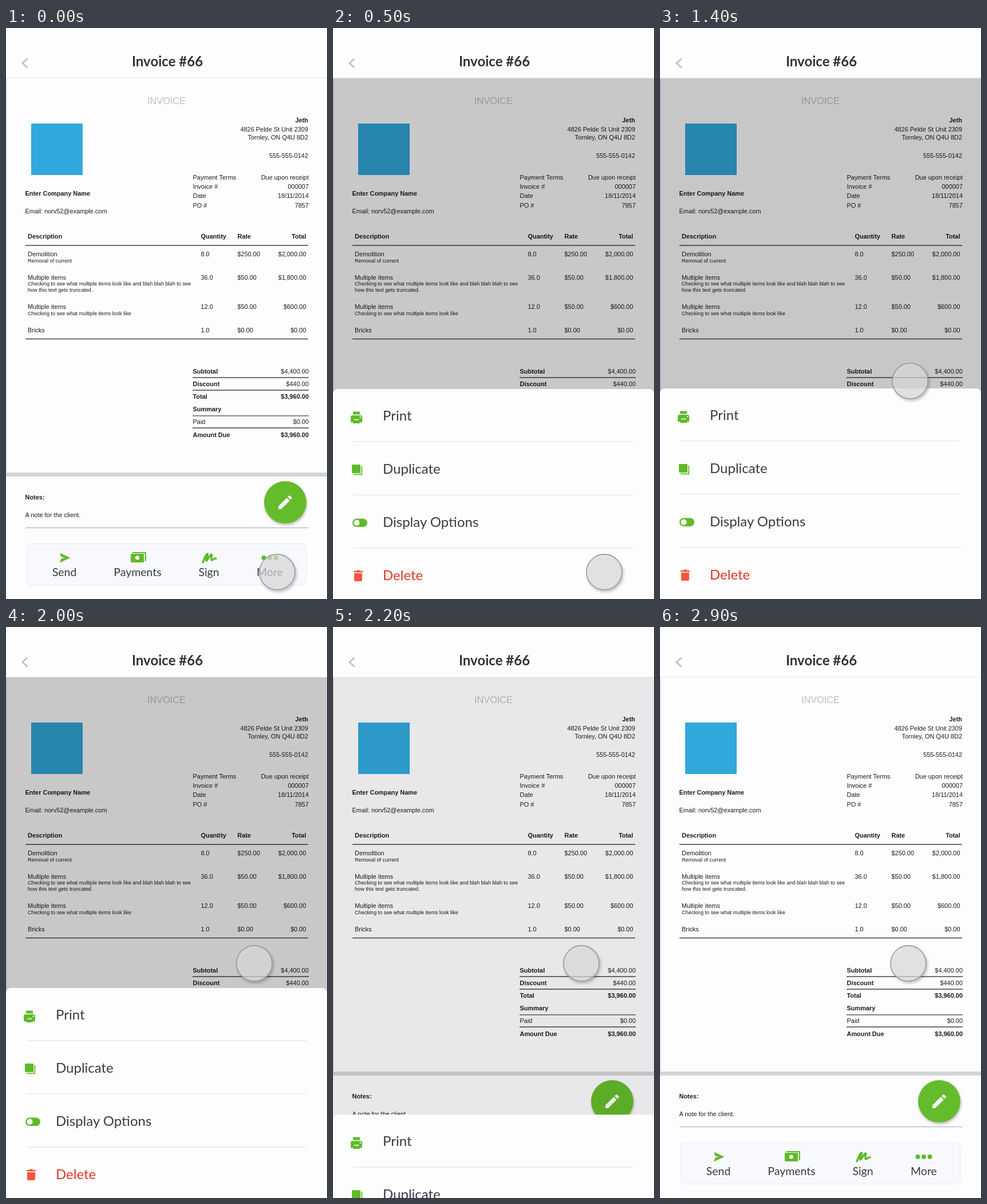
These frames come from a looping animation (561 by 998 pixels, 3 s). An HTML page:

```html
<!DOCTYPE html>
<html lang="en">
<head>
<meta charset="utf-8">
<title>Invoice menu</title>
<style>
  html, body { margin: 0; width: 100%; height: 100%; overflow: hidden; background: #fdfcfe; }
  svg { display: block; width: 100%; height: 100%; }
  #page { font: 10.95px "Liberation Sans", Arial, sans-serif; fill: #1c1c1e; }
  #page .small { font-size: 9.12px; }
  .bold { font-weight: 700; }
  .end { text-anchor: end; }
  .ui { font-family: Lato, sans-serif; fill: #383c43; }
  .mid { text-anchor: middle; }
  .green { fill: #5fba27; }
  .line { fill: none; stroke: #5fba27; stroke-linecap: round; }
  .rule { stroke: #444446; stroke-width: 1.3; }
  .thin { stroke: #e8e8eb; stroke-width: 1.5; }
  #fab { filter: drop-shadow(1px 3px 2px rgba(0, 0, 0, .25)); }
  #cursor { filter: drop-shadow(2px 3px 2px rgba(0, 0, 0, .28)); }
</style>
</head>
<body>
<svg viewBox="0 0 561 998" preserveAspectRatio="none">
  <rect width="561" height="998" fill="#fdfcfe"/>

  <g id="page">
    <rect y="87" width="1" height="690" fill="#c9c9cb"/>
    <rect y="777" width="561" height="7" fill="#d4d4d6"/>
    <text x="280.5" y="132.5" class="mid" font-size="16.3" fill="#bfbfc1">INVOICE</text>
    <rect x="44" y="167" width="90" height="90" fill="#31a8dc"/>
    <path class="rule" d="M34 380H528M34 543.5H528M326 611H529M326 633H529M326 677.8H529M326 699H529"/>
    <path d="M34 873.5H528" stroke="#bdbdbf" stroke-width="1.3"/>
  </g>

  <g class="ui" font-size="19.5">
    <rect x="36.5" y="901.5" width="488" height="72" rx="6" fill="#f8f9fc" stroke="#e9ebf1"/>
    <g class="green">
      <path d="M94 917.5L112.5 926 94 934.5 96.5 927.5 103 926 96.5 924.5z"/>
      <rect x="218" y="919" width="23" height="15" rx="1"/>
      <path class="line" stroke-width="2.2" d="M221.5 917H243.8V931"/>
      <circle cx="229.5" cy="926" r="3.6" fill="#fff"/>
      <path class="line" stroke-width="3.4"
            d="M344 934C347 926 350 919 352 919C354 919 348 931 350 931C352 931 357 920 359 920C361 920 357 930 360 930C363 930 364 926 367 927"/>
      <circle cx="450.5" cy="926" r="4"/><circle cx="461" cy="926" r="4"/><circle cx="471.5" cy="926" r="4"/>
    </g>
    <g class="mid">
      <text x="102" y="957.5">Send</text><text x="230" y="957.5">Payments</text>
      <text x="354.5" y="957.5">Sign</text><text x="461" y="957.5">More</text>
    </g>
  </g>

  <g id="fab">
    <circle cx="488" cy="829" r="37" fill="#64bb2c"/>
    <path transform="translate(472 813) scale(1.33)" fill="#fff"
          d="M3 17.25V21h3.75L17.81 9.94l-3.75-3.75zM20.71 7.04a1 1 0 0 0 0-1.41l-2.34-2.34a1 1 0 0 0-1.41 0l-1.83 1.83 3.75 3.75z"/>
  </g>

  <rect id="dim" y="87" width="561" height="911" opacity="0"/>

  <g class="ui">
    <rect width="561" height="87" fill="#fefefe"/>
    <path d="M0 87.5H561" stroke="#e6e6ea"/>
    <path d="M37.5 53.5L29 61.5L37.5 69.5" fill="none" stroke="#c3c3c5" stroke-width="3"/>
    <text x="282" y="66.5" class="mid bold" font-size="24" fill="#2f343b">Invoice #66</text>
  </g>

  <g id="sheet" class="ui" font-size="24">
    <path d="M0 400V9Q0 0 9 0H552Q561 0 561 9V400z" fill="#fefdfe"/>
    <path class="thin" d="M36 92H525.5M36 185H525.5M36 278H525.5"/>
    <g class="green">
      <path d="M35 39.5h12v5h-12zM31 58V49q0-3 3-3h14q3 0 3 3v9h-4v2h-12v-2z"/>
      <path d="M36.8 53.5h8.4" stroke="#fff" stroke-width="1.5"/>
      <circle cx="47.8" cy="49.2" r="1.2" fill="#fff"/>
      <rect x="33" y="132" width="15" height="15" rx="1"/>
      <path class="line" stroke-width="1.8" d="M50.3 135.5V149.3H36.5"/>
      <rect x="34" y="226.5" width="26" height="14.5" rx="7.25"/>
      <circle cx="41.5" cy="233.7" r="5" fill="#fff"/>
    </g>
    <path d="M36 318h4.5l1.5-1.5h4l1.5 1.5h4.5v2.5h-16zM37 322h14v12q0 2-2 2h-10q-2 0-2-2z" fill="#f4563c"/>
    <text x="87" y="55">Print</text>
    <text x="87" y="148">Duplicate</text>
    <text x="87" y="241">Display Options</text>
    <text x="87" y="334" fill="#dc3522">Delete</text>
  </g>

  <g id="cursor">
    <circle r="31" fill="rgba(234,234,235,.66)" stroke="#a0a0a2" stroke-width="1.8"/>
  </g>
</svg>

<script>
const $ = id => document.getElementById(id);

function write(x, y, text, style = "") {
  const node = document.createElementNS("http://www.w3.org/2000/svg", "text");
  node.setAttribute("x", x);
  node.setAttribute("y", y);
  node.setAttribute("class", style);
  node.textContent = text;
  $("page").append(node);
}

write(528, 165, "Jeth", "bold end");
write(528, 181, "4826 Pelde St Unit 2309", "end");
write(528, 195, "Tornley, ON Q4U 8D2", "end");
write(528, 227, "555-555-0142", "end");
write(33.5, 293, "Enter Company Name", "bold");
write(33.5, 324, "Email: norv52@example.com");

[
  ["Payment Terms", "Due upon receipt"],
  ["Invoice #", "000007"],
  ["Date", "18/11/2014"],
  ["PO #", "7857"]
].forEach(([label, value], i) => {
  const y = 264.5 + i * 16.4;
  write(326.5, y, label);
  write(529, y, value, "end");
});

function tableRow(y, cells, style = "") {
  [38, 340.5, 404.5].forEach((x, i) => write(x, y, cells[i], style));
  write(524.5, y, cells[3], style + " end");
}
tableRow(368, ["Description", "Quantity", "Rate", "Total"], "bold");
tableRow(399, ["Demolition", "8.0", "$250.00", "$2,000.00"]);
tableRow(439.5, ["Multiple items", "36.0", "$50.00", "$1,800.00"]);
tableRow(491, ["Multiple items", "12.0", "$50.00", "$600.00"]);
tableRow(531.5, ["Bricks", "1.0", "$0.00", "$0.00"]);
write(38, 410, "Removal of current", "small");
write(38, 450, "Checking to see what multiple items look like and blah blah blah to see", "small");
write(38, 460.5, "how this text gets truncated.", "small");
write(38, 501.5, "Checking to see what multiple items look like", "small");

[
  ["Subtotal", "$4,400.00", "bold", ""],
  ["Discount", "$440.00", "bold", ""],
  ["Total", "$3,960.00", "bold", "bold"],
  ["Summary", "", "bold", ""],
  ["Paid", "$0.00", "", ""],
  ["Amount Due", "$3,960.00", "bold", "bold"]
].forEach(([label, value, left, right], i) => {
  const y = 604 + i * 22.1;
  write(326.5, y, label, left);
  write(529, y, value, right + " end");
});
write(33.5, 823.5, "Notes:", "bold");
write(33.5, 854.5, "A note for the client.");

const LOOP = 3000, STEP = 100;
const progress = (t, start, length) => Math.min(1, Math.max(0, (t - start) / length));
const smooth = p => p * p * (3 - 2 * p);
const cubic = p => p < .5 ? 4 * p ** 3 : 1 - 4 * (1 - p) ** 3;

function draw(t) {
  const open = smooth(progress(t, 126, 386)) - smooth(progress(t, 1988, 372));
  const move = cubic(progress(t, 890, 700));
  $("sheet").setAttribute("transform", `translate(0 ${998 - 368 * open})`);
  $("dim").setAttribute("opacity", .21 * open);
  $("cursor").setAttribute("transform", `translate(${474 - 40 * move} ${951 - 363 * move})`);
}

const begin = performance.now();
function tick() {
  const t = Math.max(0, performance.now() - begin) % LOOP;
  draw(Math.floor(t / STEP) * STEP);
  requestAnimationFrame(tick);
}
tick();
</script>
</body>
</html>
```
